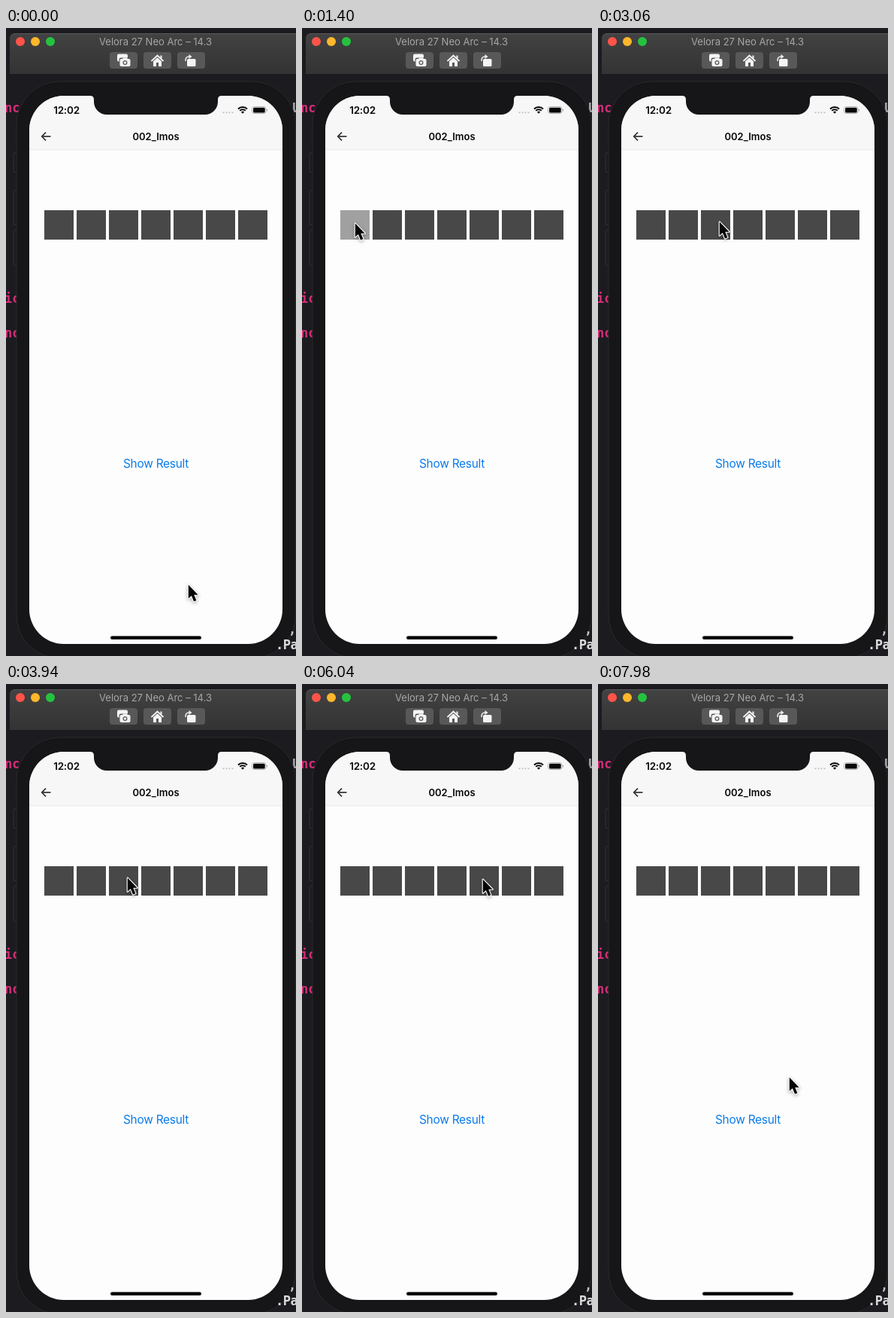
An HTML page with a canvas that plays this animation: 386x834 px, repeating every 8000 ms.

```html
<!DOCTYPE html>
<html lang="en">
<head>
<meta charset="utf-8">
<title>Simulator</title>
<style>
  html, body { margin: 0; width: 100%; height: 100%; overflow: hidden; background: #1b1b20; }
  canvas { display: block; width: 386px; height: 834px; }
</style>
</head>
<body>
<canvas id="stage"></canvas>
<script>
const W = 386, H = 834, LOOP = 8000;
const SANS = 'Inter, Roboto, sans-serif';
const MONO = '"DejaVu Sans Mono", "Liberation Mono", monospace';
const CODE = 'bold 17px ' + MONO;
const DESK = '#1b1b20', BEZEL = '#161618', INK = '#080808', PAPER = '#fdfdfd';
const ICON = '#f4f4f4', BUTTON = '#585858', KEYWORD = '#d62c78';

const canvas = document.getElementById('stage');
const dpr = window.devicePixelRatio || 1;
canvas.width = W * dpr;
canvas.height = H * dpr;
const ctx = canvas.getContext('2d');

// Cursor stops: time, x, y
const stops = [
  [0, 242, 738], [120, 242, 738], [820, 114, 309], [1120, 70, 258],
  [1450, 70, 258], [1900, 154, 260], [2200, 154, 260], [3000, 161, 256],
  [4220, 161, 256], [4700, 235, 254], [5300, 235, 254], [5900, 240, 258],
  [7250, 240, 258], [7980, 254, 521], [LOOP, 254, 521]
];

// Lit cells: index, from, to
const taps = [[0, 1260, 2240], [2, 4100, 5060]];

const ease = p => p * p * (3 - 2 * p);

function cursorAt(t) {
  const i = Math.max(1, stops.findIndex(s => s[0] > t));
  const [t0, x0, y0] = stops[i - 1], [t1, x1, y1] = stops[i];
  const p = ease((t - t0) / (t1 - t0));
  return [x0 + (x1 - x0) * p, y0 + (y1 - y0) * p];
}

function rounded(x, y, w, h, r) {
  ctx.beginPath();
  ctx.roundRect(x, y, w, h, r);
}

function box(x, y, w, h, r, color) {
  rounded(x, y, w, h, r);
  ctx.fillStyle = color;
  ctx.fill();
}

function frame(x, y, w, h, r, color) {
  rounded(x, y, w, h, r);
  ctx.strokeStyle = color;
  ctx.lineWidth = 1;
  ctx.stroke();
}

function disc(x, y, r, color) {
  ctx.beginPath();
  ctx.arc(x, y, r, 0, Math.PI * 2);
  ctx.fillStyle = color;
  ctx.fill();
}

function poly(points, color) {
  ctx.beginPath();
  points.forEach(([x, y]) => ctx.lineTo(x, y));
  ctx.closePath();
  ctx.fillStyle = color;
  ctx.fill();
}

function line(points, color, width) {
  ctx.beginPath();
  points.forEach(([x, y]) => ctx.lineTo(x, y));
  ctx.strokeStyle = color;
  ctx.lineWidth = width;
  ctx.stroke();
}

function text(str, x, y, font, color, align = 'left', spacing = 0) {
  ctx.font = font;
  ctx.fillStyle = color;
  ctx.textAlign = align;
  ctx.letterSpacing = spacing + 'px';
  ctx.fillText(str, x, y);
}

function drawDesk() {
  ctx.fillStyle = DESK;
  ctx.fillRect(0, 0, W, H);
  text('nc', -2, 112, CODE, KEYWORD);
  text('ic', -2, 365, CODE, KEYWORD);
  text('nc', -2, 411, CODE, KEYWORD);
  text("'U", 371, 112, CODE, '#a9a9b0');
}

function drawWindowBar() {
  const shade = ctx.createLinearGradient(0, 8, 0, 61);
  shade.addColorStop(0, '#424242');
  shade.addColorStop(1, '#333333');
  box(5, 7, 400, 54, [6, 0, 0, 0], shade);
  line([[10, 7.5], [W, 7.5]], '#5a5a5a', 1);

  ['#ff5449', '#ffb82c', '#24c23e'].forEach((c, i) => disc(19 + i * 20, 18, 6, c));
  text('Velora 27 Neo Arc – 14.3', 199, 22.5, '13px ' + SANS, '#a6a6a6', 'center');
  [138, 183, 228].forEach(x => box(x, 32, 37, 22, 4, BUTTON));
  drawCameraIcon();
  drawHomeIcon();
  drawRotateIcon();
}

function drawCameraIcon() {
  box(148, 34.5, 14, 10, 2, ICON);
  box(150.5, 39.5, 16, 12.5, 2.5, BUTTON);
  box(151.5, 41, 14, 10, 2, ICON);
  box(155.5, 39.5, 6, 3, 1, ICON);
  disc(158.5, 46, 3, BUTTON);
  disc(158.5, 46, 1.8, ICON);
}

function drawHomeIcon() {
  line([[193.5, 44], [201.5, 36.5], [209.5, 44]], ICON, 1.8);
  poly([[196, 44.3], [201.5, 39.3], [207, 44.3], [207, 51], [196, 51]], ICON);
  box(200, 46, 3, 5, 0, BUTTON);
  box(205.5, 36.5, 2, 4, 0, ICON);
}

function drawRotateIcon() {
  box(241, 41, 11.5, 10, 1.5, ICON);
  ctx.beginPath();
  ctx.moveTo(239, 44);
  ctx.quadraticCurveTo(238.5, 38, 244, 38);
  ctx.strokeStyle = ICON;
  ctx.lineWidth = 1.5;
  ctx.stroke();
  poly([[243.5, 35], [247.5, 38], [243.5, 41]], ICON);
}

function drawPhone() {
  [[165, 27], [215, 47], [268, 48]].forEach(([y, h]) => {
    box(9.5, y, 5, h, 2, '#303034');
    box(10.5, y + 1, 4, h - 2, 1, DESK);
  });
  box(14, 71, 371.5, 766, 57, BEZEL);
  frame(14, 71, 371.5, 766, 57, '#2a2a2c');

  text(',', 376, 805, CODE, '#c4c4c4');
  text('.Pa', 359, 825, CODE, '#dcdcdc', 'left', -0.5);

  ctx.save();
  rounded(31, 90, 337, 728, 46);
  ctx.clip();
  ctx.fillStyle = PAPER;
  ctx.fillRect(31, 90, 337, 728);
  ctx.fillStyle = '#f7f7f7';
  ctx.fillRect(31, 90, 337, 71.5);
  ctx.fillStyle = '#dedede';
  ctx.fillRect(31, 161.5, 337, 0.7);
  ctx.restore();
  drawNotch();
}

function drawNotch() {
  ctx.beginPath();
  ctx.moveTo(112, 89);
  ctx.lineTo(112, 90);
  ctx.quadraticCurveTo(117, 90, 117, 95);
  ctx.lineTo(117, 98);
  ctx.arcTo(117, 115, 134, 115, 17);
  ctx.lineTo(265, 115);
  ctx.arcTo(282, 115, 282, 98, 17);
  ctx.lineTo(282, 95);
  ctx.quadraticCurveTo(282, 90, 287, 90);
  ctx.lineTo(287, 89);
  ctx.closePath();
  ctx.fillStyle = BEZEL;
  ctx.fill();
}

function drawStatus() {
  text('12:02', 80.5, 114, '600 13.5px ' + SANS, INK, 'center', -0.2);
  for (let i = 0; i < 4; i++) disc(289.5 + i * 4, 112.3, 1.1, '#c2c2c2');

  ctx.strokeStyle = INK;
  ctx.lineWidth = 2;
  [8.5, 5.3].forEach(r => {
    ctx.beginPath();
    ctx.arc(315, 113.5, r, -Math.PI * 0.75, -Math.PI * 0.25);
    ctx.stroke();
  });
  poly([[312.8, 111.4], [315, 110.4], [317.2, 111.4], [315, 113.8]], INK);

  frame(327.5, 104.5, 18.5, 9, 2.8, '#b4b4b4');
  box(329, 105.8, 15.7, 6.6, 1.5, INK);
  box(346.8, 107.5, 1.3, 3, 0.6, '#b4b4b4');
}

function drawPage(t) {
  line([[59.5, 144], [48, 144]], '#303030', 1.7);
  line([[53, 138.7], [47.7, 144], [53, 149.3]], '#303030', 1.7);
  text('002_Imos', 199.5, 149, '600 13px ' + SANS, INK, 'center');

  for (let i = 0; i < 7; i++) {
    const lit = taps.some(([n, from, to]) => n === i && t >= from && t < to);
    box(51 + i * 43, 242, 39, 39, 0, lit ? '#a0a0a0' : '#484848');
  }
  text('Show Result', 199.5, 583.5, '15.5px ' + SANS, '#0b7ceb', 'center', -0.3);
  box(139, 807.5, 121, 4.5, 2.2, '#030303');
}

function drawCursor(t) {
  const [x, y] = cursorAt(t);
  ctx.save();
  ctx.translate(x + 0.8, y + 1.5);
  ctx.scale(0.9, 0.9);
  ctx.beginPath();
  [[0, 0], [0, 20], [4.6, 16], [8, 24.5], [11.8, 23], [8.3, 14.8], [14.3, 14.6]]
    .forEach(([px, py]) => ctx.lineTo(px, py));
  ctx.closePath();
  ctx.lineJoin = 'round';
  ctx.shadowColor = 'rgba(0, 0, 0, 0.35)';
  ctx.shadowBlur = 4 * dpr;
  ctx.shadowOffsetY = 1.5 * dpr;
  ctx.strokeStyle = '#fafafa';
  ctx.lineWidth = 2.6;
  ctx.stroke();
  ctx.shadowColor = 'transparent';
  ctx.fillStyle = '#050505';
  ctx.fill();
  ctx.restore();
}

const start = performance.now();

function draw() {
  const t = (performance.now() - start) % LOOP;
  ctx.setTransform(dpr, 0, 0, dpr, 0, 0);
  drawDesk();
  drawWindowBar();
  drawPhone();
  drawStatus();
  drawPage(t);
  drawCursor(t);
  requestAnimationFrame(draw);
}
draw();
</script>
</body>
</html>
```
